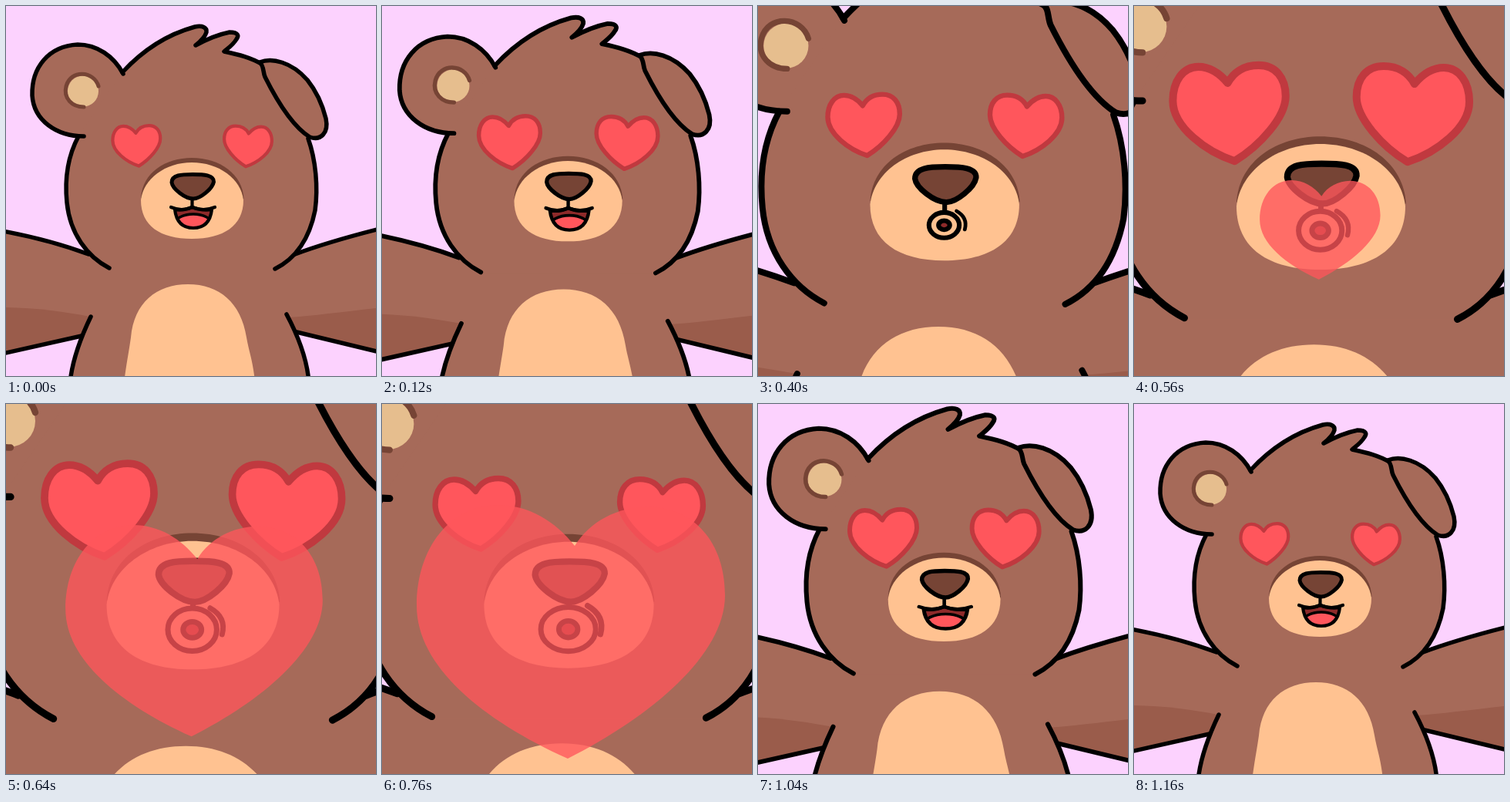
An HTML page with a canvas for the animation above (1200 ms loop, 480x480 px).

```html
<!DOCTYPE html>
<html lang="en">
<head>
<meta charset="utf-8">
<title>Bear kiss</title>
<style>
html, body { margin: 0; width: 100%; height: 100%; overflow: hidden; background: #fcd2fe; }
canvas { display: block; width: 480px; height: 480px; }
</style>
</head>
<body>
<canvas id="stage" width="480" height="480"></canvas>
<script>
const ctx = document.getElementById('stage').getContext('2d');
const LOOP = 1200, STEP = 40, LINE = 5.5;
const BROWN = '#a66a59', SHADE = '#9a5c4b', DARK = '#764435', SKIN = '#ffc291';
const RED = '#ff565c', RIM = '#c0393f', MOUTH = '#8e2a2a', BLACK = '#000';

const shape = {
  torso: 'M-9 291C40 300 75 310 107 322L134 330H349L375 322C410 309 445 299 489 288V450L377 423C385 442 391 460 393 489H83C85 465 90 447 98 428L-9 452Z',
  shadeL: 'M-9 391C35 391 72 396 109 403L98 428L-9 452Z',
  shadeR: 'M365 404C400 402 440 396 489 391V450L377 423Z',
  armL: 'M-9 291C40 300 75 310 107 322M-9 452L98 428',
  armR: 'M489 288C445 299 410 309 375 322M377 423L489 450',
  sideL: 'M110 403C97 430 86 458 83 489',
  sideR: 'M364 400C380 430 391 460 393 489',
  belly: 'M153 489C156 465 160 445 162 430C166 385 195 361 236 361C277 361 305 385 312 430C315 448 321 462 323 489Z',
  head: 'M94 169L151 86C175 60 205 38 245 27C255 25 261 28 260 34C258 41 251 47 246 51Q270 38 290 34C302 34 302 39 299 43C295 50 289 54 283 59C302 63 318 67 333 76L392 172C402 200 405 235 401 265C394 300 377 327 349 341H134C105 325 83 295 79 255C76 225 80 195 94 169Z',
  cheekL: 'M94 169C80 195 76 225 79 255C83 295 105 325 134 340',
  cheekR: 'M392 172C402 200 405 235 401 265C394 300 377 327 349 341',
  hair: 'M151 86C175 60 205 38 245 27C255 25 261 28 260 34C258 41 251 47 246 51Q270 38 290 34C302 34 302 39 299 43C295 50 289 54 283 59C302 63 318 67 333 76',
  earL: 'M152 88C140 65 118 50 93 50C55 52 33 80 34 116C36 148 65 169 101 169',
  innerEar: 'M80 110.500a20 20 0 1 0 40 0a20 20 0 1 0 -40 0Z',
  earArc: 'M120 104C114 84 84 82 78 104C74 120 86 131 101 131',
  earR: 'M329 73C345 67 370 72 391 96C403 111 411 130 415 146C419 165 408 175 394 170C370 155 350 120 336 92C333 85 335 78 329 73Z',
  muzzleTop: 'M175 249C177 216 207 197 241 197C277 197 307 218 308.500 250Z',
  muzzle: 'M175 252C178 224 207 203 241 203C276 203 305 224 308 252C308 285 282 302 241 302C200 302 175 285 175 252Z',
  nose: 'M215 229C215 219 228 218.500 242 218.500C256 218.500 270 219 269.500 228C268 237 252 250 243 250C232 250 216 237 215 229Z',
  stem: 'M241.500 250V261',
  lip: 'M214 261Q228 267 241.500 261Q256 267 271 261',
  jaw: 'M219 264C221 281 230 288 243 288C256 288 265 281 267 264Q254 266 241.500 261Q230 266 219 264Z',
  tongue: 'M219 283a24 13 0 1 1 48 0a24 13 0 1 1 -48 0Z',
  puff: 'M254.500 255Q267 262 263.500 275',
  eye: 'M-2 -39C-12 -51 -25 -60 -40 -60C-60 -60 -73 -41 -73 -16C-73 18 -30 50 7 62C40 42 73 5 73 -22C73 -46 60 -62 38 -62C18 -62 5 -52 -2 -39Z',
  kiss: 'M250 184C225 152 190 131 150 131C90 131 45 185 45 262C45 340 130 410 241 460C350 405 445 325 445 248C445 180 405 134 345 133C305 134 270 152 250 184Z'
};
for (const k in shape) shape[k] = new Path2D(shape[k]);

const clamp = v => Math.min(1, Math.max(0, v));
const span = (t, a, b) => clamp((t - a) / (b - a));
const smooth = v => (1 - Math.cos(Math.PI * v)) / 2;

function draw(path, fill, line, width = LINE) {
  if (fill) { ctx.fillStyle = fill; ctx.fill(path); }
  if (line) { ctx.strokeStyle = line; ctx.lineWidth = width; ctx.stroke(path); }
}

// Runs paint with the drawing scaled about (x, y).
function scaled(x, y, sx, sy, paint) {
  ctx.save();
  ctx.translate(x, y);
  ctx.scale(sx, sy);
  ctx.translate(-x, -y);
  paint();
  ctx.restore();
}

function oval(x, y, rx, ry, fill, line, width) {
  const p = new Path2D();
  p.ellipse(x, y, rx, ry, 0, 0, 7);
  draw(p, fill, line, width);
}

// The heart grows from a point a little below its middle.
function drawEye(x, y, size, flip) {
  ctx.save();
  ctx.translate(x, y - 6 * (size - 1));
  ctx.scale(flip * size / 2.36, size / 2.36);
  draw(shape.eye, RED, RIM, 10);
  ctx.restore();
}

function drawSmile(t) {
  const wide = t > 600 ? 1 - span(t, 860, 1120) : 0;
  scaled(242, 261, 1 + 0.26 * wide, 1 - 0.12 * wide, () => {
    ctx.save();
    draw(shape.jaw, MOUTH);
    ctx.clip(shape.jaw);
    draw(shape.tongue, RED, BLACK, 3.5);
    ctx.restore();
    draw(shape.jaw, null, BLACK, 4.2);
    draw(shape.lip, null, BLACK, 4.2);
  });
}

function drawPout(t) {
  const u = (t - 400) / 360, e = Math.sin(Math.PI / 2 * u);
  const k = 0.82 + 0.3 * u;
  oval(241, 270.5 + e, 13.5 + 8 * u, 11.3 + 6 * e, SKIN, BLACK, 4.2);
  oval(241, 270.5 + e, 5 + 2.4 * e, 4 + 2.5 * e, MOUTH, BLACK, 4.2);
  scaled(241, 271, k, k, () => draw(shape.puff, null, BLACK, 4));
}

function drawBear(t, zoom) {
  draw(shape.torso, BROWN);
  draw(shape.shadeL, SHADE);
  draw(shape.shadeR, SHADE);
  draw(shape.belly, SKIN);
  for (const k of ['armL', 'armR', 'sideL', 'sideR']) draw(shape[k], null, BLACK);

  draw(shape.earL, BROWN);
  draw(shape.head, BROWN);
  for (const k of ['earL', 'cheekL', 'cheekR', 'hair']) draw(shape[k], null, BLACK);
  draw(shape.earR, BROWN, BLACK);
  draw(shape.innerEar, '#e6be8e');
  draw(shape.earArc, null, DARK, 5);

  draw(shape.muzzleTop, DARK);
  draw(shape.muzzle, SKIN);
  draw(shape.stem, null, BLACK, 4.2);
  if (t >= 320 && t < 840) drawPout(t); else drawSmile(t);
  draw(shape.nose, DARK, BLACK, 5);

  const beat = smooth(2 * t / 387);
  const size = 1 + (t < 387 ? 0.32 : 0.4) * beat + 0.05 * zoom;
  drawEye(169.3, 181.3, size, 1);
  drawEye(314, 182, size, -1);
}

function render(t) {
  ctx.fillStyle = '#fcd2fe';
  ctx.fillRect(0, 0, 480, 480);
  ctx.lineCap = ctx.lineJoin = 'round';

  const zoom = smooth(span(t, 0, 660)) - smooth(span(t, 700, 1150));
  const cam = 1 + 0.685 * zoom;
  scaled(240, 240, cam, cam, () => drawBear(t, zoom));

  const grow = Math.sin(Math.PI / 2 * span(t, 505, 720));
  if (grow > 0) {
    ctx.globalAlpha = 0.78 * (1 - span(t, 760, 1005));
    scaled(239, 287, grow, grow, () => draw(shape.kiss, RED));
    ctx.globalAlpha = 1;
  }
}

const start = performance.now();
function tick() {
  const t = (performance.now() - start) % LOOP;
  render(Math.floor(t / STEP) * STEP);
  requestAnimationFrame(tick);
}
tick();
</script>
</body>
</html>
```
